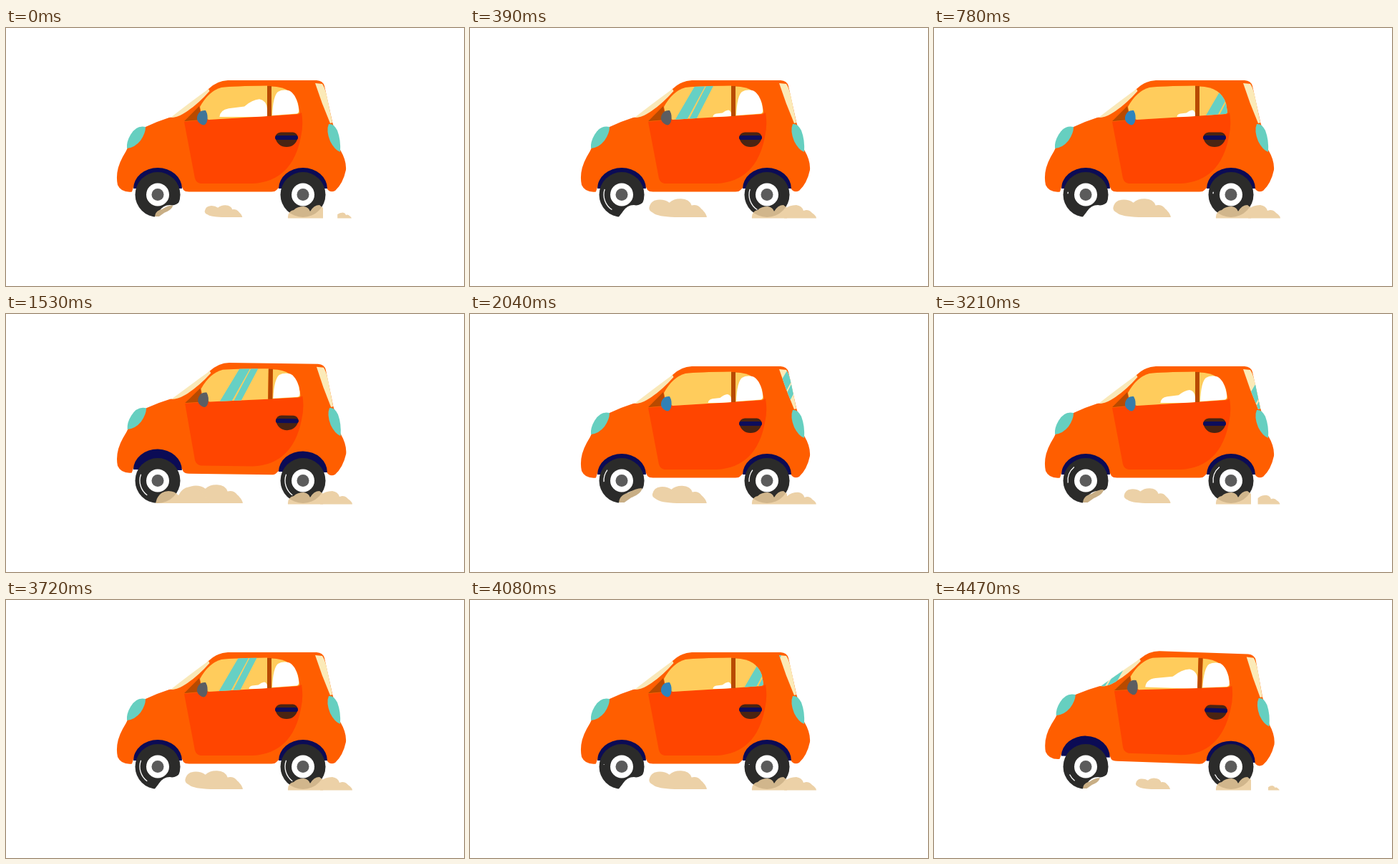
Write an HTML page that moves like this. It is 640 by 360 pixels and loops after 4500 ms.

```html
<!DOCTYPE html>
<html lang="en">
<head>
<meta charset="utf-8">
<title>Little orange car</title>
<style>
  html, body { margin: 0; width: 100%; height: 100%; overflow: hidden; background: #fff; }
  svg { display: block; width: 100vw; height: 100vh; }
</style>
</head>
<body>
<svg viewBox="0 0 640 360">
  <defs>
    <path id="front" d="M271 110Q283 88 301 83Q318 81 365 80.500V123L283 128L273 120Z"/>
    <path id="rear" d="M371 81.500Q400 82 408 105L410 117Q410 119.500 406 120L371 122.500Z"/>
    <path id="windshield" d="M230 125Q257 104 283 85L284.500 88Q266 109 247 120Q239 125 230 125Z"/>
    <path id="pillar" d="M432 77L442 78Q446 84 449 98L456 132L453 133Q441 105 432 77Z"/>
    <clipPath id="glass">
      <use href="#front"/><use href="#rear"/><use href="#windshield"/><use href="#pillar"/>
    </clipPath>
    <clipPath id="frontClip"><use href="#front"/></clipPath>
    <g id="wheel">
      <circle r="31.500" fill="#2b2b2a"/>
      <circle r="16" fill="#fff"/>
      <circle r="8.500" fill="#5b5b5b"/>
      <path id="shine" fill="none" stroke="#fff" stroke-width="1.300"/>
    </g>
  </defs>

  <g id="car">
    <path fill="#ff5e00" d="M283 85Q295 73.500 310 73L434 73Q443 73.500 445 81L456 131L467 170Q476 185 475 198Q471 217 460 227Q454 230 450 226L447 222H382L378 226Q376 228.500 371 228.500H256Q250 228.500 248 226L246 222H178L176 228.500Q161 230 156 219Q152 200 163 180Q168 172 171 165L195 138Q212 130 228 125L235 124Q264 105 283 85Z"/>
    <path fill="#0b0b55" d="M178 224A34 29 0 0 1 246 224ZM381 224A34 29 0 0 1 449 224Z"/>
    <path fill="#ff4500" d="M249 131L283 128L409 120.500L413 118Q416 135 412 152Q400 214 345 217H272Q266 216 264 210Z"/>
    <use href="#windshield" fill="#f9e8b8"/>
    <use href="#pillar" fill="#fbeab8"/>
    <use href="#front" fill="#ffcc5c"/>
    <use href="#rear" fill="#ffcc5c"/>
    <g clip-path="url(#glass)">
      <path id="glare" fill="#66d0c4" d="M290 140L331 70H345L307 140ZM310 140L346 70H356L320 140Z"/>
    </g>
    <path id="rearWhite" fill="#fff" d="M372 122Q373 95 380 89Q387 85 396 87.500Q406 93 409 112Q410 119 406 119.500Z"/>
    <g clip-path="url(#frontClip)">
      <path id="frontWhite" fill="#fff" d="M292 124Q293 113 306 111L330 108Q342 98 353 97Q364 99 365 112V124Z"/>
    </g>
    <path fill="#b84a00" d="M249 130L270 109L274 128ZM365 81H371V123H365Z"/>
    <path id="mirror" d="M268 121Q271 114 279 115Q283 122 281 130Q279 137 274 135Q264 130 268 121Z"/>
    <g fill="#66cfc0">
      <path d="M195 138Q182 135 174 149Q168 159 169 168Q180 167 188 157Q195 147 195 138Z"/>
      <path d="M451 134Q458 133 463 143Q468 156 467 173Q459 170 453 158Q447 143 451 134Z"/>
    </g>
    <path fill="#4a2412" d="M376 153Q377 146 384 145.500H401Q407 146 408 153Q404 166 392 166Q380 166 376 153Z"/>
    <rect x="376" y="150" width="32" height="6" rx="3" fill="#0d0d5c"/>
  </g>

  <use href="#wheel" x="212" y="232.500"/>
  <use href="#wheel" x="415" y="232.500"/>
  <path id="bite" fill="#fff" d="M206 266L213 257Q219 247 229 247Q237 249 244 241V266Z"/>
  <path id="scrap" fill="#c8ae85" d="M208 263Q209 252 222 249Q232 242 242 242Q241 250 226 256L216 263Z"/>
  <g fill="#eacb9b" opacity=".87">
    <path id="leftDust" d="M248 250Q250 240 260 239Q270 238 277 243Q284 237 294 237.500Q306 238 309 247Q318 245 323 252Q330 258 331 264H285Q260 263 254 258Q247 255 248 250Z"/>
    <path id="rightDust" d="M439 265.500V253Q446 247 456 247Q464 248 466 255Q473 252 478 258Q484 262 484 265.500Z"/>
    <path d="M394 265.500Q393 256 402 254Q407 249 416 249Q423 250 425 256Q430 247 438 247L443 251V265.500Z"/>
    <path id="wheelDust" d="M209 264Q212 248 227 247Q236 247 241 253Q246 242 258 241Q268 242 273 249L285 264Z"/>
  </g>
</svg>
<script>
const LOOP = 4500, STEP = 30, CYCLE = 1095;
const el = id => document.getElementById(id);
const set = (id, name, value) => el(id).setAttribute(name, value);
const show = (id, on) => set(id, "visibility", on ? "visible" : "hidden");
const clamp = v => Math.min(1, Math.max(0, v));
const mix = (a, b, f) => a + (b - a) * f;
const bump = (v, from, to) => v > from && v < to ? Math.sin(Math.PI * (v - from) / (to - from)) : 0;

function scaleAt(id, x, y, k) {
  set(id, "transform", `translate(${x} ${y}) scale(${k}) translate(${-x} ${-y})`);
}

function arc(middle, length, r = 25) {
  const point = a => `${r * Math.cos(a * Math.PI / 180)} ${r * Math.sin(a * Math.PI / 180)}`;
  return `M${point(middle - length / 2)}A${r} ${r} 0 0 1 ${point(middle + length / 2)}`;
}

function draw(t) {
  const phase = t % CYCLE;
  const life = (phase + CYCLE - 90) % CYCLE / CYCLE; // dust is thinnest at 0

  // One big hop per loop; the nose rocks twice per cycle.
  const hop = 6 * bump(t, 1440, 1800);
  const tilt = Math.max(2.1 * bump(t % (CYCLE / 2), 10, 210), hop * .19);
  set("car", "transform", `translate(0 ${-hop}) rotate(${tilt} 366 214)`);

  // Reflections slide back over the glass.
  const puff = clamp(1.9 * Math.sin(Math.PI * life) - .35);
  set("glare", "transform", `translate(${(phase - 435) * .23} 0)`);
  show("rearWhite", phase < 480 || phase > 860);
  show("frontWhite", !hop && (phase < 480 || phase > 700));
  scaleAt("frontWhite", 365, 124, mix(1, .35, puff));
  const blue = Math.sqrt(bump(life, .315, 1));
  set("mirror", "fill", `rgb(${mix(92, 45, blue)}, ${mix(93, 132, blue)}, ${mix(97, 190, blue)})`);

  set("shine", "d", arc(135 + phase * .065, 75 * Math.abs(Math.sin(Math.PI * phase / 800))));

  // Each puff swells and shrinks toward its tail.
  scaleAt("leftDust", 329, 264, mix(.58, .97, puff));
  scaleAt("rightDust", 482, 265.5, mix(.35, 1, puff));
  scaleAt("scrap", 208, 263, mix(.7, 1, puff));
  show("scrap", life > .75 || life < .05);
  show("wheelDust", hop);
  show("bite", !hop);
}

function frame() {
  draw(Math.floor(performance.now() % LOOP / STEP) * STEP);
  requestAnimationFrame(frame);
}
frame();
</script>
</body>
</html>
```
